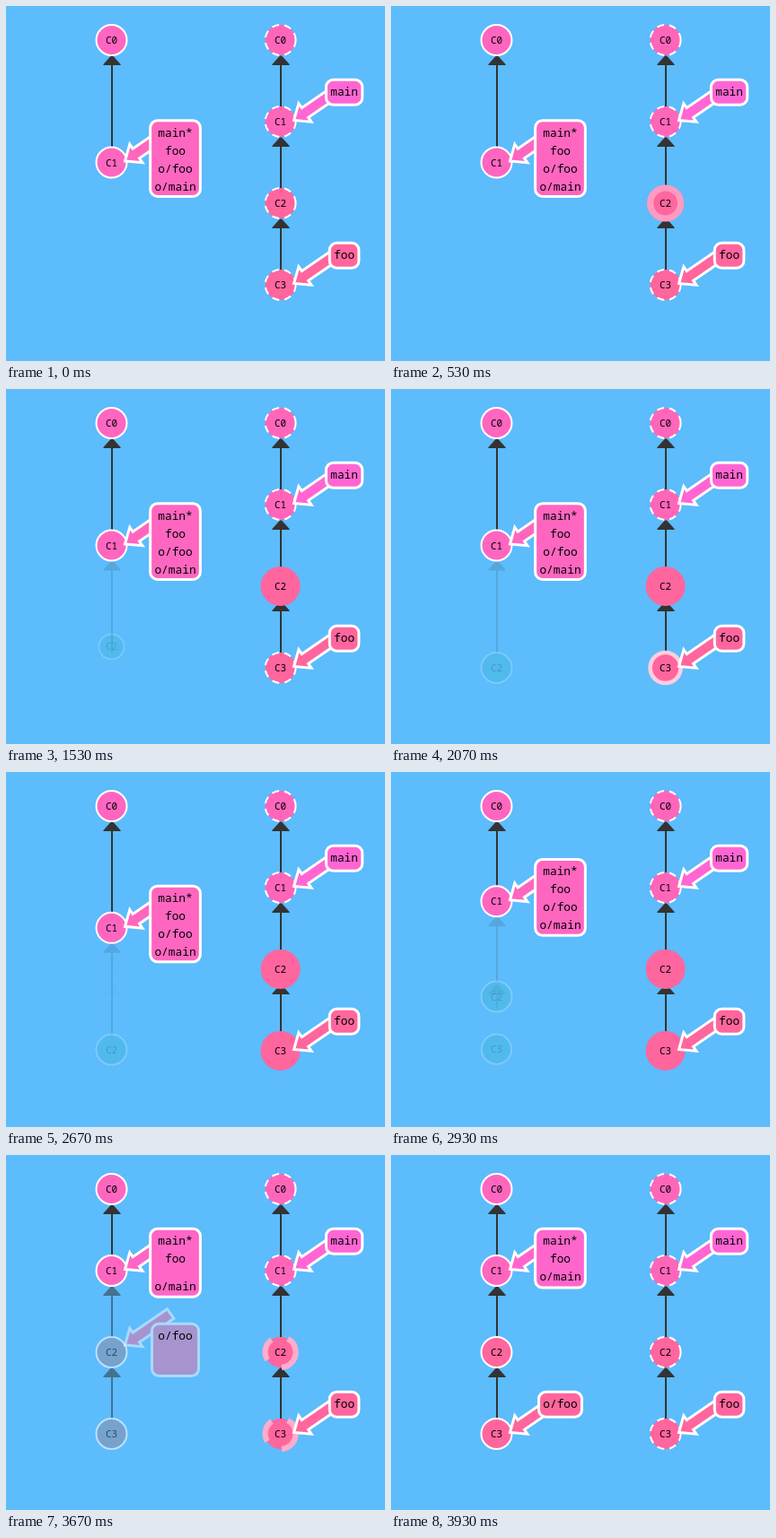
An HTML page for the animation above (3990 ms loop, 422 px wide and 396 px high).

```html
<!DOCTYPE html>
<html lang="en">
<head>
<meta charset="utf-8">
<title>Fetching a branch</title>
<style>
  html, body { margin: 0; width: 100%; height: 100%; overflow: hidden; background: #5cbcfc; }
  svg { display: block; width: 422px; height: 396px; }
  text { font-family: "Noto Sans Mono", "DejaVu Sans Mono", monospace; text-anchor: middle; fill: #000; }
  .node text { font-size: 11px; }
  .label text { font-size: 12.83px; }
  .label rect, .label path { stroke: #fff; stroke-width: 3; }
  .edge line { stroke: #333; stroke-width: 2; }
  .edge path { fill: #333; }
</style>
</head>
<body>
<svg id="stage" viewBox="0 0 422 396"></svg>
<script>
const LOOP = 3990, FPS = 15, TWEEN = 520, BOUNCE = 837;
// Start of each step, in ms
const LIGHT_C2 = 227, BIRTH_C2 = 992, LIGHT_C3 = 1860, BIRTH_C3 = 2623, FINISH = 3418;

const LEFT = 117.5, RIGHT = 305.6, TOP = 38, GAP = 91, WIDE_GAP = 136.5;
const R = 17, CHAR = 7.7, ROW = 20;
const PINK = [255, 102, 157], MAIN = [255, 102, 211], SHARED = [255, 102, 186];
const LOCAL = [255, 102, 192], STACK = [255, 102, 203];
const TEAL = [36, 179, 179], WHITE = [255, 255, 255];

const row = i => TOP + GAP * i;
const wideRow = i => TOP + WIDE_GAP * i;
const lerp = (a, b, p) => a + (b - a) * p;
const mix = (a, b, p) => a.map((v, i) => lerp(v, b[i], p));
const rgb = c => `rgb(${c.map(Math.round)})`;
const clamp = n => Math.min(1, Math.max(0, n));

function easeInOut(n) {
  if (n <= 0 || n >= 1) return clamp(n);
  const q = 0.48 - n / 1.04, s = Math.sqrt(0.1734 + q * q);
  const t = Math.cbrt(s - q) + Math.cbrt(-s - q) + 0.5;
  return 3 * (1 - t) * t * t + t ** 3;
}

function bounce(n) {
  n = clamp(n) * 2.75;
  if (n < 1) return n * n;
  if (n < 2) return (n - 1.5) ** 2 + 0.75;
  if (n < 2.5) return (n - 2.25) ** 2 + 0.9375;
  return (n - 2.625) ** 2 + 0.984375;
}

const stage = document.getElementById("stage");

function set(el, attrs) {
  for (const key in attrs) el.setAttribute(key, attrs[key]);
}

function add(parent, tag, attrs, text) {
  const el = document.createElementNS("http://www.w3.org/2000/svg", tag);
  set(el, attrs);
  if (text) el.textContent = text;
  return parent.appendChild(el);
}

const layers = ["edge", "node", "label"].map(name => add(stage, "g", { class: name }));
const [edgeLayer, nodeLayer, labelLayer] = layers;

// Arrow from a child's top edge (y2) up to its parent (y1), on a whole pixel
function makeEdge(column) {
  const x = Math.ceil(column);
  const g = add(edgeLayer, "g");
  const line = add(g, "line", { x1: x, x2: x });
  const head = add(g, "path", { d: "M-1 17.5H1L9.6 27V28H-9.6V27Z" });
  return (y1, y2, opacity = 1) => {
    set(g, { opacity });
    set(line, { y1: y1 + 24, y2: Math.max(y2 - R, y1 + 24) });
    set(head, { transform: `translate(${x} ${y1})` });
  };
}

function makeNode(x, name) {
  const g = add(nodeLayer, "g");
  const circle = add(g, "circle");
  add(g, "text", { y: 4 }, name);
  return ({ y, fill, r = R, stroke = WHITE, width = 2, dashed = false, opacity = 1 }) => {
    set(g, { transform: `translate(${x} ${y})`, opacity });
    set(circle, {
      r, fill: rgb(fill), stroke: rgb(stroke), "stroke-width": width,
      "stroke-dasharray": dashed ? `${4 * width} ${3 * width}` : "none"
    });
  };
}

// Fat pointer, given along and across its axis, tip first
const ARROW = [[0, 0], [15, 12.5], [15, 6.5], [61.5, 6.5], [61.5, -6.5], [15, -6.5], [15, -12.5]]
  .map(([u, v]) => [15 + 0.824 * u - 0.566 * v, -1.5 - 0.566 * u - 0.824 * v]);
const ARROW_PATH = "M" + ARROW.join("L") + "Z";

const boxWidth = chars => chars * CHAR + 9.5;
const boxHeight = rows => 9 + 18.9 * rows;
const labelY = nodeY => nodeY - 32.5;

function makeLabel(x, names) {
  const g = add(labelLayer, "g");
  const cx = x + 71;
  const shape = add(g, "g");
  const arrow = add(shape, "path", { d: ARROW_PATH });
  const rect = add(shape, "rect", { rx: 8 });
  const texts = names.map(name => add(g, "text", { x: cx }, name));
  return ({ nodeY, fill, w, h, rows, boxY = rows[0], opacity = 1 }) => {
    set(shape, { opacity, fill: rgb(fill) });
    set(arrow, { transform: `translate(${x} ${nodeY})` });
    set(rect, { x: cx - w / 2, y: boxY - 14.2, width: w, height: h });
    texts.forEach((el, i) => set(el, { y: rows[i] + 3.7 }));
  };
}

const edge01 = makeEdge(LEFT), edge12 = makeEdge(LEFT), edge23 = makeEdge(LEFT);
for (let i = 0; i < 3; i++) makeEdge(RIGHT)(row(i), row(i + 1));

const node3 = makeNode(LEFT, "C3"), node2 = makeNode(LEFT, "C2");
const node1 = makeNode(LEFT, "C1"), node0 = makeNode(LEFT, "C0");
node0({ y: TOP, fill: LOCAL });

const [far0, far1, far2, far3] = ["C0", "C1", "C2", "C3"].map(name => makeNode(RIGHT, name));
far0({ y: row(0), fill: SHARED, dashed: true });
far1({ y: row(1), fill: SHARED, dashed: true });

function fixedLabel(name, y, fill) {
  makeLabel(RIGHT, [name])({
    nodeY: y, fill, w: boxWidth(name.length), h: boxHeight(1), rows: [labelY(y)]
  });
}
fixedLabel("main", row(1), MAIN);
fixedLabel("foo", row(3), PINK);

const stack = makeLabel(LEFT, ["main*", "foo", "o/main"]);
const tracker = makeLabel(LEFT, ["o/foo"]);

function drawFar(node, y, lit, done, finishing) {
  const p = lit * (1 - done);
  node({
    y, fill: PINK, stroke: mix(WHITE, PINK, p), width: lerp(2, 10, p),
    dashed: finishing || lit === 0
  });
}

function draw(t) {
  const tween = start => easeInOut((t - start) / TWEEN);
  const drop = start => bounce((t - start) / BOUNCE);
  const shift = tween(BIRTH_C3), done = tween(FINISH);
  const finishing = t >= FINISH;

  drawFar(far2, row(2), tween(LIGHT_C2), done, finishing);
  drawFar(far3, row(3), tween(LIGHT_C3), done, finishing);

  const y1 = lerp(wideRow(1), row(1), shift);
  edge01(TOP, y1);
  node1({ y: y1, fill: LOCAL });

  const fill = mix(TEAL, PINK, done);
  const nodeFade = lerp(0.2, 1, done), edgeFade = lerp(0.15, 1, done);

  const drop2 = drop(BIRTH_C2), grow2 = tween(BIRTH_C2);
  const end2 = lerp(wideRow(2), row(2), shift);
  node2({ y: lerp(y1, end2, drop2), r: R * drop2, fill, opacity: nodeFade * drop2 });
  edge12(y1, lerp(y1, end2, grow2), edgeFade * grow2);

  const drop3 = drop(BIRTH_C3);
  node3({ y: lerp(row(2), row(3), drop3), r: R * drop3, fill, opacity: nodeFade * drop3 });
  edge23(row(2), lerp(row(2), row(3), shift), edgeFade * shift);

  const top = labelY(y1);
  stack({
    nodeY: y1, fill: mix(LOCAL, STACK, done), w: boxWidth(6),
    h: lerp(boxHeight(4), boxHeight(3), done),
    rows: [top, top + ROW, top + ROW * lerp(3, 2, done)]
  });

  tracker({
    nodeY: lerp(y1, row(3), done), fill: PINK, opacity: done,
    w: lerp(boxWidth(6), boxWidth(5), done),
    h: lerp(boxHeight(4), boxHeight(1), done),
    rows: [lerp(top + 2 * ROW, labelY(row(3)), done)]
  });
}

const begin = performance.now();

// The picture advances in steps of 1/15 s, rounded to 10 ms
function tick() {
  const t = (performance.now() - begin) % LOOP;
  const step = Math.floor((Math.floor(t / 10) + 0.5) * FPS / 100);
  draw(step * 1000 / FPS);
  requestAnimationFrame(tick);
}
tick();
</script>
</body>
</html>
```
